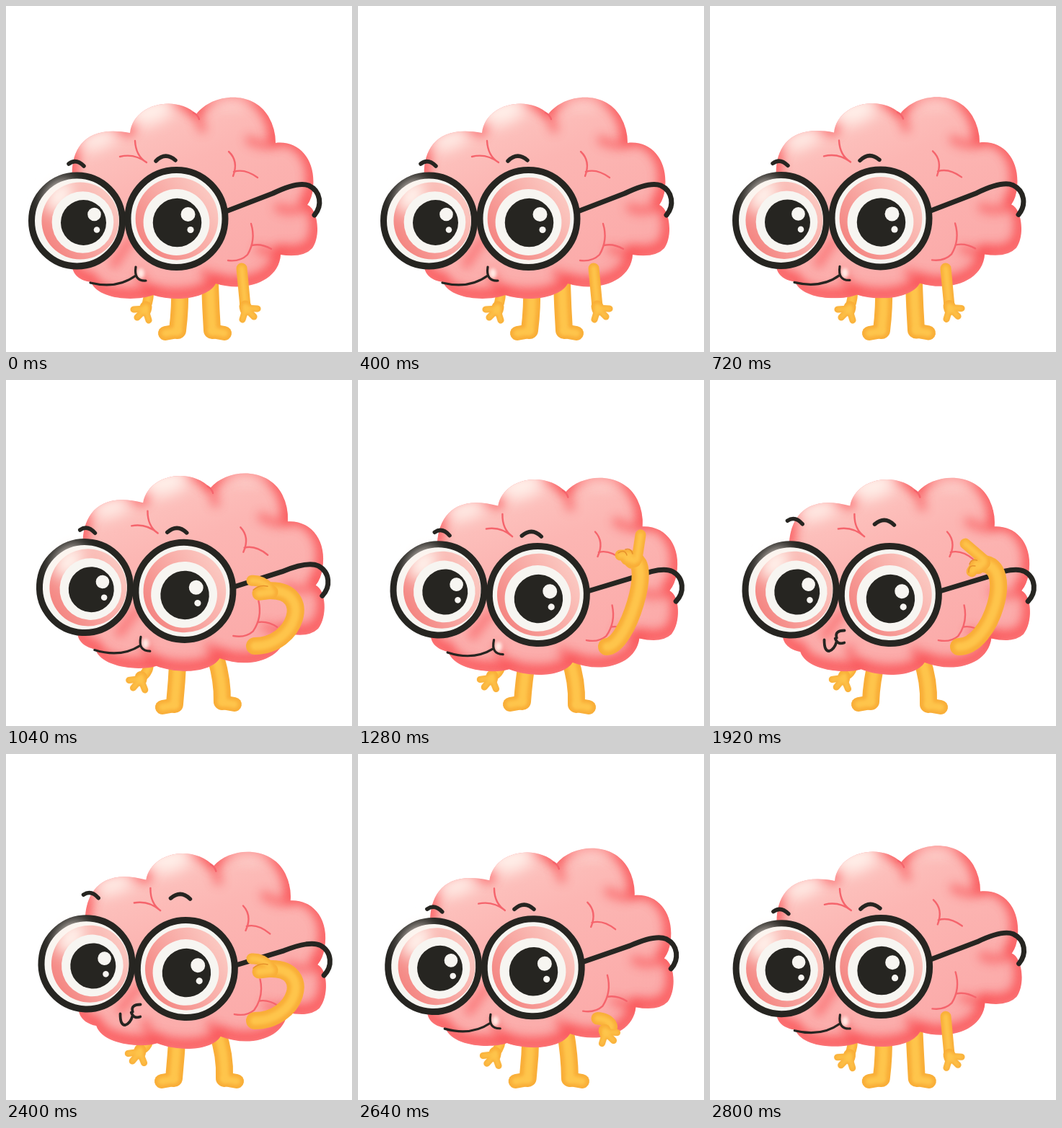
Write an HTML page that moves like this. It is 480 by 480 pixels and loops after 2.88 s.

```html
<!DOCTYPE html>
<html lang="en">
<head>
<meta charset="utf-8">
<title>Thinking brain</title>
<style>
  html, body { margin: 0; width: 100%; height: 100%; overflow: hidden; background: #fff; }
  svg { display: block; width: 100vw; height: 100vh; }
  path { fill: none; stroke-linecap: round; stroke-linejoin: round; }
  .ink { stroke: #262521; }
  .crease { stroke: #f5646c; stroke-width: 2.4; }
  .shade { stroke: #fa5256; fill: none; filter: url(#blur); }
  .glow { fill: #fff4ee; filter: url(#wideBlur); }
</style>
</head>
<body>
<svg viewBox="0 0 480 480">
  <defs>
    <filter id="thinBlur" filterUnits="userSpaceOnUse" x="-480" y="-480" width="1440" height="1440"><feGaussianBlur stdDeviation="2.2"/></filter>
    <filter id="blur" filterUnits="userSpaceOnUse" x="0" y="0" width="480" height="480"><feGaussianBlur stdDeviation="7"/></filter>
    <filter id="wideBlur" filterUnits="userSpaceOnUse" x="0" y="0" width="480" height="480"><feGaussianBlur stdDeviation="10"/></filter>
    <path id="outline" style="fill:inherit" d="M92 240C89 200 108 164 172 176C177 135 236 123 264 150C286 121 342 116 364 153Q374 170 374 190C407 186 430 214 426 252Q425 266 418 276C433 282 437 319 425 336Q412 350 381 345C379 382 332 398 291 385C280 406 235 411 204 401C181 410 128 408 118 383C102 381 91 372 92 358Z"/>
    <clipPath id="body"><use href="#outline"/></clipPath>
    <linearGradient id="skin" x2=".6" y2="1">
      <stop stop-color="#fdcfc9"/><stop offset=".45" stop-color="#fcb6b3"/><stop offset="1" stop-color="#fba9a8"/>
    </linearGradient>
    <linearGradient id="lid" x1=".1" y1=".8" x2=".9" y2=".2">
      <stop stop-color="#f48682"/><stop offset=".5" stop-color="#f8a9a4"/><stop offset="1" stop-color="#fbc8c1"/>
    </linearGradient>
  </defs>

  <g id="back"></g>

  <g id="head">
    <g clip-path="url(#body)">
      <use href="#outline" fill="url(#skin)"/>
      <use href="#outline" class="shade" stroke-width="19" transform="translate(-1 -5)" opacity=".85"/>
      <path class="shade" stroke-width="13" opacity=".6" d="M264 146L272 170M374 188Q360 198 338 186M418 277Q396 288 378 280M381 346L352 338M291 387L276 370M204 402Q190 388 186 374M150 358L172 325"/>
      <ellipse class="glow" cx="200" cy="146" rx="38" ry="17" transform="rotate(-20 200 146)"/>
      <ellipse class="glow" cx="126" cy="184" rx="34" ry="13" transform="rotate(-20 126 184)"/>
      <ellipse class="glow" cx="310" cy="130" rx="36" ry="8" opacity=".7"/>
    </g>

    <path class="crease" d="M179 187Q180 208 195 217M158 209Q178 204 195 217M260 148Q266 151 268 157M309 202Q323 215 315 236M316 230Q331 225 349 238M340 302Q347 325 335 345Q325 355 308 353M341 332Q354 329 368 337"/>
    <path class="ink" stroke-width="7" d="M305 285L370 260Q405 243 420 249C437 257 439 277 428 290"/>
    <path id="brows" class="ink" stroke-width="5.5" d="M87 219Q97 211 108 222M208 215Q221 202 235 214"/>

    <g id="lenses"></g>

    <g id="smile">
      <ellipse cx="187" cy="371" rx="5" ry="7" fill="#ffe9e3" filter="url(#thinBlur)"/>
      <path class="ink" stroke-width="3.2" d="M117 384Q154 393 180 374M180 362Q177 382 194 381"/>
    </g>
    <path id="whistle" class="ink" stroke-width="3.8" d="M150 364Q151 380 158 379Q165 376 167 366M177 349Q163 350 167 360M165 361Q169 370 178 366"/>
  </g>

  <g id="front"></g>
</svg>

<script>
const LOOP = 2880, STEP = 80, TAP_TIME = 1280 / 3;
const $ = id => document.getElementById(id);

const circle = (x, y, r, fill, extra = '') => `<circle cx="${x}" cy="${y}" r="${r}" fill="${fill}" ${extra}/>`;

// The pupil sits at (dx, dy) from the middle of the lens.
function lens(x, y, r, dx, dy, glare = '') {
  const white = '#f7f5f1', px = x + dx, py = y + dy;
  return circle(x, y, r, white, 'class="ink" stroke-width="9"') +
    circle(x + dx / 2, y, r * .85, 'url(#lid)') + glare +
    circle(px - 1, py, r * .68, white) +
    circle(px, py + .5, r * .5, '#262521') +
    circle(px + 15, py - 11, r * .148, white) +
    circle(px + 18.5, py + 10.5, r * .068, white);
}
$('lenses').innerHTML =
  lens(98.5, 298, 63, 9, 2, '<ellipse class="glow" cx="74" cy="264" rx="17" ry="25" transform="rotate(35 74 264)"/>') +
  lens(236.5, 295, 67.5, 1, 5);

// Strokes are [path, width]: an orange rim below a soft yellow core.
const limb = strokes =>
  strokes.map(([d, w]) => `<path d="${d}" stroke="#f9ae38" stroke-width="${w}"/>`).join('') +
  strokes.map(([d, w]) => `<path d="${d}" stroke="#fec54c" stroke-width="${w * .5}" filter="url(#thinBlur)"/>`).join('');
const fold = d => `<path d="${d}" stroke="#e6912c" stroke-width="1.5"/>`;

const hands = {
  open: limb([['M0 0L1 4', 17], ['M1 2L17 3', 9], ['M2 4L12 14', 9], ['M0 5L-4 18', 9]]),
  grip: limb([['M0 2L-17 4', 19], ['M-3 -4Q-14 -15 -27 -14', 15]]) + fold('M-25 -1Q-16 -9 -5 -6'),
  point: limb([['M2 0L-7 -3', 20], ['M6 -2L11 -35', 15], ['M-4 -7L-17 -7', 15]]) +
    fold('M-20 -10Q-11 -16 -8 -7M-10 -15Q-2 -17 0 -9')
};
const placeHand = (name, x, y, angle, flip = 1) =>
  `<g transform="translate(${x} ${y}) rotate(${angle}) scale(${flip} 1)">${hands[name]}</g>`;

function ramp(t, from, to) {
  const k = Math.min(1, Math.max(0, (t - from) / (to - from)));
  return k * k * (3 - 2 * k);
}
const between = (t, inFrom, inTo, outFrom, outTo) => ramp(t, inFrom, inTo) - ramp(t, outFrom, outTo);

// Every part moves by these few amounts, each from 0 to 1.
function motion(t) {
  const lean = between(t, 720, 1160, 2400, 2860);
  const think = between(t, 1080, 1260, 2240, 2400);
  const jump = t > 680 && t < 1160 ? Math.sin((t - 680) / 480 * Math.PI) ** 2 : 0;
  return {
    lean, think, jump,
    drop: 7 * lean - 9 * jump,
    raise: between(t, 720, 920, 2460, 2740),
    tap: think * (1 - Math.cos((t - 1280) / TAP_TIME * 2 * Math.PI)) / 2,
    brow: between(t, 1480, 1640, 2440, 2640)
  };
}

function rightArm({ lean, think, raise, tap, drop }) {
  const sx = 327 + 18 * raise, sy = 364 + 6 * lean;
  const x = 332 + 36 * raise + 13 * think - 3 * tap;
  const y = 417 - 126 * raise + drop - 48 * think + 5 * tap;
  const bend = 58 * raise - 29 * think + 17 * tap;
  const hand = think > .5 ? 'point' : raise > .5 ? 'grip' : 'open';
  return limb([[`M${sx} ${sy}C${sx + bend} ${sy} ${x + bend} ${y} ${x} ${y}`, 15 + 9 * raise]]) +
    placeHand(hand, x, y, -58 * tap);
}

function leftArm({ lean }) {
  const x = 194 - 8 * lean, y = 418 - 7 * lean;
  return limb([[`M198 390Q199 405 ${x} ${y}`, 14]]) + placeHand('open', x, y, -5 * lean, -1);
}

// Step is how far the foot has moved; toe points left (-1) or right (1).
function leg(hip, step, y, toe) {
  const x = hip + 3 * -toe * (toe < 0 ? -1 : -1) + step;
  return limb([
    [`M${hip + step * .6} 386Q${hip + 1 + step * 1.2} 418 ${x} ${y - 3}`, 24],
    [`M${x} ${y - 2}L${x + toe * 17} ${y + 1}`, 20]
  ]);
}

function draw(t) {
  const m = motion(t);
  const whistling = t >= 1600 && t < 2560;
  $('head').setAttribute('transform', `translate(0 ${m.drop}) rotate(${4.2 * m.lean} 298 475)`);
  $('brows').setAttribute('transform', `translate(0 ${-16 * m.brow})`);
  $('smile').style.display = whistling ? 'none' : '';
  $('whistle').style.display = whistling ? '' : 'none';
  $('back').innerHTML = leftArm(m) +
    leg(241, -5 * (m.lean + m.think + m.tap), 453 - 4 * m.think, -1) +
    leg(283, 17 * m.lean, 453 - 8 * m.jump, 1);
  $('front').innerHTML = rightArm(m);
}

let shown = -1;
function tick() {
  const t = Math.floor(performance.now() % LOOP / STEP) * STEP;
  if (t !== shown) draw(shown = t);
  requestAnimationFrame(tick);
}
tick();
</script>
</body>
</html>
```
